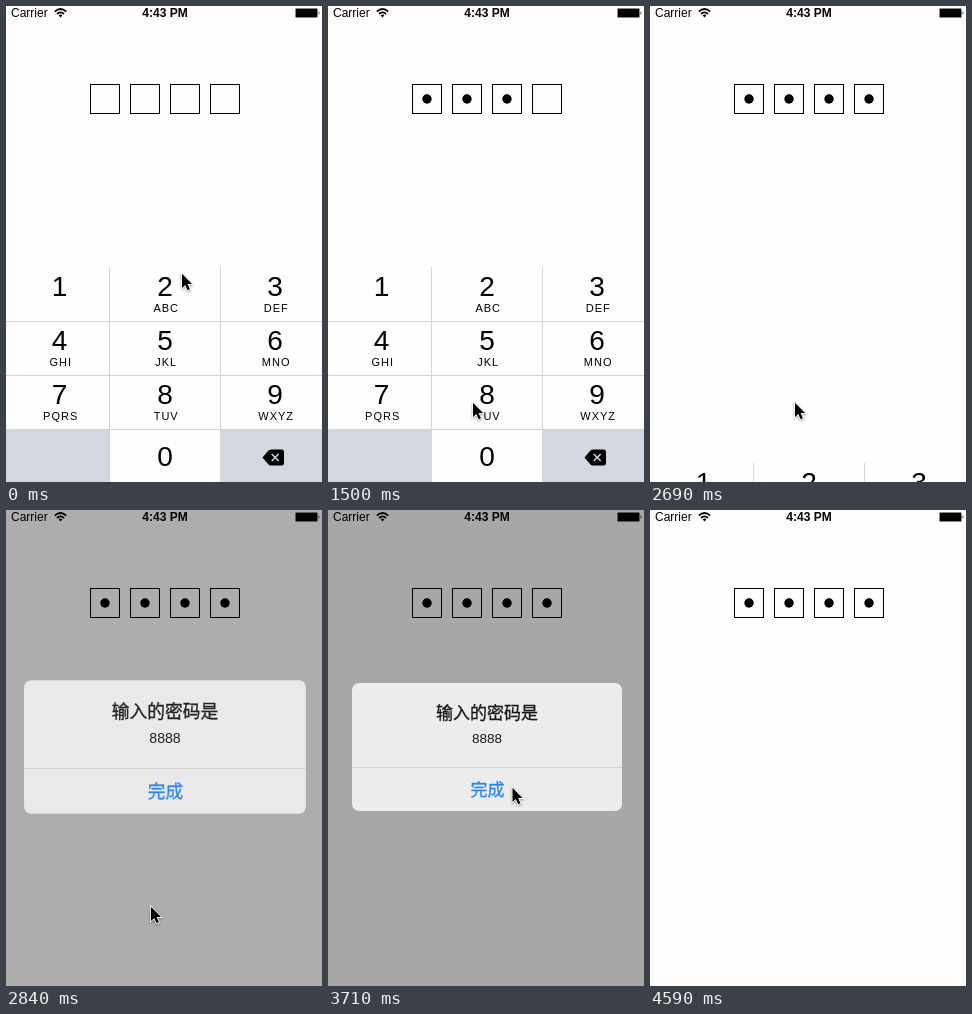
An HTML page for the animation above (5170 ms loop, 316 by 476 pixels).

```html
<!DOCTYPE html>
<html lang="zh">
<head>
<meta charset="utf-8">
<title>Passcode</title>
<style>
html, body { margin: 0; width: 100%; height: 100%; overflow: hidden; background: #fefefe; }
svg { display: block; width: 316px; height: 476px; font-family: "Liberation Sans", Arial, sans-serif; }
.mid { text-anchor: middle; }
.digit { font-size: 28px; }
.letters { font-size: 11px; letter-spacing: 1px; }
.cjk { font-family: "Noto Sans CJK SC", "Noto Sans CJK", sans-serif; font-weight: 500; font-size: 17px; stroke-width: .3; }
#cursor { filter: drop-shadow(0 1px 1px #0006); }
</style>
</head>
<body>
<svg viewBox="0 0 316 476">
  <rect width="316" height="476" fill="#fefefe"/>

  <g font-size="12">
    <text x="5" y="11">Carrier</text>
    <text class="mid" x="159" y="11" font-weight="700">4:43 PM</text>
  </g>
  <g fill="none" stroke="#000" stroke-width="1.8">
    <path d="M48.8 5.6Q54.5.4 60.2 5.6M51 8Q54.5 4.8 58 8"/>
    <path d="M52.6 9.2Q54.5 7.8 56.4 9.2L54.5 11.4Z" fill="#000" stroke="none"/>
  </g>
  <rect x="289.5" y="2.5" width="22" height="9" rx="1" stroke="#888"/>
  <path d="M312.6 5Q314.4 7 312.6 9Z"/>

  <g id="boxes"></g>
  <g id="pad"></g>

  <rect id="dim" width="316" height="476"/>
  <g id="alert">
    <rect x="24" y="173" width="270" height="128" rx="7" fill="#f8f8f8"/>
    <path d="M24 257.5H294" stroke="#dadada"/>
    <text class="mid cjk" x="159" y="209" stroke="#000">输入的密码是</text>
    <text class="mid" x="159" y="233.3" font-size="13.5">8888</text>
    <text class="mid cjk" x="159.5" y="286" fill="#157efb" stroke="#157efb">完成</text>
  </g>

  <path id="cursor" d="M1 .8V15L4.3 12L6.6 17.3L8.9 16.3L6.6 11.1H11Z"
    stroke="#fff" stroke-width="1.6" paint-order="stroke"/>
</svg>
<script>
const LOOP = 5170, BEATS = 35; // the picture advances in even beats
const DOT_BEATS = [7, 10, 10, 17];
const $ = id => document.getElementById(id);

const ramp = (n, from, to) => Math.min(1, Math.max(0, (n - from) / (to - from)));
const easeOut = (u, p) => 1 - (1 - u) ** p;
const easeInOut = (u, p) => u < .5 ? (2 * u) ** p / 2 : 1 - (2 - 2 * u) ** p / 2;

function buildBoxes() {
  $('boxes').innerHTML = DOT_BEATS.map((_, i) => {
    const x = 84 + 40 * i;
    return `<rect x="${x + .5}" y="78.5" width="29" height="29" fill="none" stroke="#000"/>
      <circle cx="${x + 15}" cy="93" r="4.7"/>`;
  }).join('');
}

function buildPad() {
  const labels = ['', 'ABC', 'DEF', 'GHI', 'JKL', 'MNO', 'PQRS', 'TUV', 'WXYZ'];
  const centers = [53.5, 159, 269];
  const digit = (n, x, y) => `<text class="mid digit" x="${x}" y="${y}">${n}</text>`;
  let out = `<rect y="261" width="316" height="215" fill="#fefefe"/>
    <path d="M0 423H103V476H0ZM215 423H316V476H215Z" fill="#d3d7df"/>
    <rect id="pressed" x="104" y="369" width="110" height="54" fill="#d3d7df"/>
    <path d="M0 315.5H316M0 369.5H316M0 423.5H316M103.5 261V476M214.5 261V476"
      fill="none" stroke="#d2d4d8"/>`;
  labels.forEach((label, i) => {
    const x = centers[i % 3], y = 290 + 54 * Math.floor(i / 3);
    out += digit(i + 1, x, y) +
      `<text class="mid letters" x="${x + 1.2}" y="${y + 16}">${label}</text>`;
  });
  out += digit(0, 159, 460) +
    `<path d="M256.5 451.5L262 445Q263.2 443.5 265 443.5H275.5Q278 443.5 278 446V457
      Q278 459.5 275.5 459.5H265Q263.2 459.5 262 458Z"/>
    <path d="M265.7 448L272.7 455M272.7 448L265.7 455" stroke="#d3d7df" stroke-width="1.5"/>`;
  $('pad').innerHTML = out;
}

buildBoxes();
buildPad();
const dots = document.querySelectorAll('#boxes circle');
const show = (el, opacity) => el.setAttribute('opacity', Number(opacity));
const move = (el, transform) => el.setAttribute('transform', transform);

function drawCursor(n) {
  // to the 8 key, up to the alert button, then off to the corner
  const toKey = easeOut(ramp(n, 0, 3), 1.8);
  const leave = ramp(n, 28, 30) ** 1.38;
  const x = 175 - 31 * toKey + 39.5 * ramp(n, 19, 22) ** 1.75 + 86 * leave;
  const y = 267 + 129 * toKey - 119 * easeInOut(ramp(n, 19, 24), 3) + 151 * leave;
  move($('cursor'), `translate(${x} ${y})`);
  show($('cursor'), n < 31);
}

function drawAlert(n) {
  const opacity = ramp(n, 18.2, 19.2) * (1 - easeInOut(ramp(n, 24.28, 26.5), 3));
  const scale = 1 + .044 * .11 ** Math.max(0, n - 19);
  show($('dim'), .4 * opacity);
  show($('alert'), opacity);
  move($('alert'), `translate(159 237) scale(${scale}) translate(-159 -237)`);
}

function draw(time) {
  const n = Math.floor(time % LOOP / LOOP * BEATS);
  dots.forEach((dot, i) => show(dot, n >= DOT_BEATS[i]));
  show($('pressed'), n >= 14 && n < 17);
  const slide = 215 * easeInOut(ramp(n, 16.21, 18.47), 2);
  move($('pad'), `translate(0 ${Math.round(slide)})`);
  drawAlert(n);
  drawCursor(n);
}

const start = performance.now();
function tick() {
  draw(performance.now() - start);
  requestAnimationFrame(tick);
}
tick();
</script>
</body>
</html>
```
